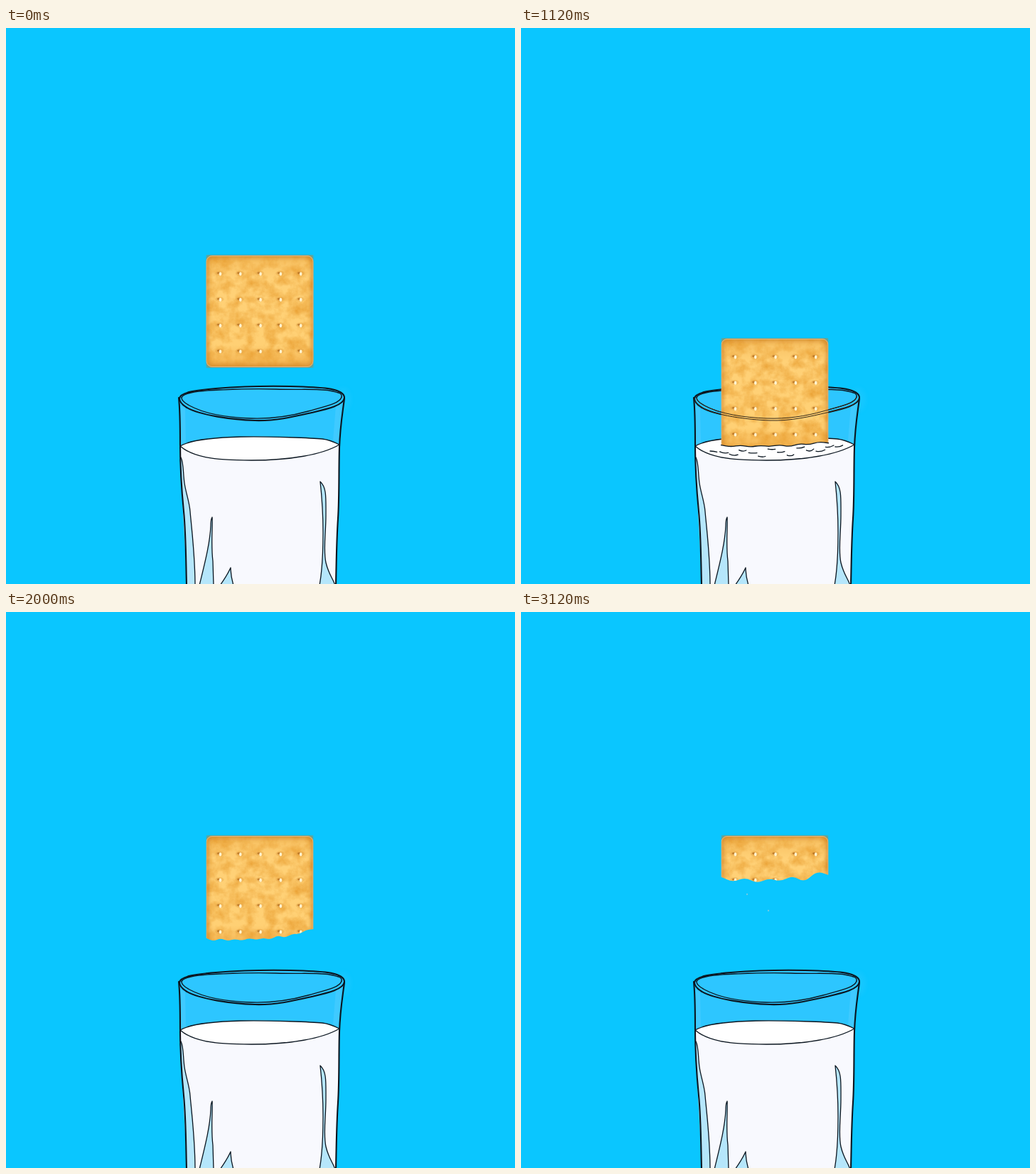
An HTML page for the animation above (3.2 s loop, 716 by 782 pixels).

```html
<!DOCTYPE html>
<html lang="en">
<head>
<meta charset="utf-8">
<title>Biscuit and milk</title>
<style>
html, body { margin: 0; width: 100%; height: 100%; overflow: hidden; background: #0ac6ff; }
svg { display: block; }
.line { fill: none; stroke: #0b1620; stroke-linecap: round; stroke-linejoin: round; stroke-width: 1.3; }
.bold { stroke-width: 2.1; }
.thin { stroke-width: 1; stroke: #33291a; }
.tint { fill: #b5e6fb; }
.milk { fill: #fff; }
</style>
</head>
<body>
<svg width="716" height="782" viewBox="0 0 716 782">
  <defs>
    <path id="front" d="M476 520C475 531 452 536 430 541S380 553 350 552S272 545 253 533Q244 527 244 521"/>
    <path id="innerFront" d="M472 519C470 528 450 532 425 539S375 550 345 549S280 543 258 531Q247 525 247 520"/>
    <linearGradient id="bake" x2="0" y2="1">
      <stop offset="0" stop-color="#f6bd5d"/>
      <stop offset=".2" stop-color="#ffd177"/>
      <stop offset=".8" stop-color="#ffd074"/>
      <stop offset="1" stop-color="#f2b04d"/>
    </linearGradient>
    <filter id="grain" x="0" y="0" width="1" height="1" color-interpolation-filters="sRGB">
      <feTurbulence type="fractalNoise" baseFrequency=".06" numOctaves="4" seed="8"/>
      <feColorMatrix values="0 0 0 0 .92  0 0 0 0 .64  0 0 0 0 .22  1.8 0 0 0 -.62"/>
      <feComposite in2="SourceGraphic" operator="in"/>
    </filter>
    <filter id="soft" x="-.5" y="-.5" width="2" height="2"><feGaussianBlur stdDeviation="3"/></filter>
    <clipPath id="cut"><path id="outline"/></clipPath>
  </defs>

  <rect width="716" height="782" fill="#0ac6ff"/>
  <ellipse cx="474" cy="523" rx="10" ry="16" fill="#2ccaff" opacity=".4" filter="url(#soft)"/>

  <!-- glass and milk -->
  <path fill="#2dc6ff" d="M244 521C245 512 270 509 295 507S360 503 400 504S476 506 476 520C473 540 469 560 469 590L245 590Z"/>
  <path fill="#52d0ff" opacity=".5" d="M246 531L252 535L253 585L246 587ZM464 531L472 527L468 584L460 580Z"/>
  <path fill="#f8f9fe" d="M245 589C244 620 252 690 254 782L464 782C465 710 469 690 469 586Z"/>
  <path class="line milk" d="M245 588C258 580 290 576 330 575S435 577 445 578S465 584 469 586C445 600 400 608 345 608S262 603 245 588Z"/>
  <path class="tint" d="M246 604C250 611 249 626 251 640S258 666 259 680S266 740 266 784L254 784C253 730 247 670 246 604Z"/>
  <path class="line" d="M246 604C250 611 249 626 251 640S258 666 259 680S266 740 266 784"/>
  <path class="line tint" d="M272 784C279 755 287 725 288 700Q288 691 290 688C291 700 288 725 291 750L292 784"/>
  <path class="line tint" d="M301 784Q311 770 316 759Q316 770 320 784"/>
  <path class="line tint" d="M441 784C445 762 446 735 446 710S445 665 442 638C451 646 450 660 450 685S446 735 450 752S460 774 463 784"/>
  <path class="line bold" d="M243 520C245 540 245 560 245 585S247 650 250 680S253 745 254 784M476 521C473 545 470 560 469 590S469 660 467 690S465 740 464 784"/>
  <path class="line bold" d="M244 521C245 512 270 509 295 507S360 503 400 504S476 506 476 520"/>
  <path class="line" d="M247 520C249 512 275 510 300 509S345 507 380 508S440 507 455 510S473 514 472 519"/>
  <use href="#front" class="line bold"/>
  <use href="#innerFront" class="line"/>

  <g id="biscuit">
    <g clip-path="url(#cut)">
      <rect width="151" height="157" rx="9" fill="url(#bake)"/>
      <rect width="151" height="157" rx="9" filter="url(#grain)"/>
      <rect width="151" height="157" rx="9" fill="none" stroke="#c97b20" stroke-width="6" opacity=".8" filter="url(#soft)"/>
      <g id="holes"></g>
      <rect x=".5" y=".5" width="150" height="156" rx="8" fill="none" stroke="#dcb886"/>
    </g>
    <path id="coat" fill="#fff"/>
  </g>

  <g id="ripples">
    <path id="dip" class="line"/>
    <path id="waves" class="line"/>
    <use href="#front" class="line thin"/>
    <use href="#innerFront" class="line thin"/>
  </g>
  <g id="crumbs" fill="#6fcbe6"></g>
</svg>

<script>
const byId = id => document.getElementById(id);
const setPath = (id, d) => byId(id).setAttribute('d', d);
const move = (id, x, y) => byId(id).setAttribute('transform', `translate(${x} ${y})`);
const show = (id, on) => byId(id).style.display = on ? '' : 'none';

const LEFT = 281.5, WIDTH = 151, HEIGHT = 157, HOLD = 320;

function random(seed) {
  return () => {
    const v = Math.sin(seed++ * 12.9898) * 43758.5453;
    return v - Math.floor(v);
  };
}

// ragged edge from left to right that climbs towards the right end
function ragged({ y, rise, rough, teeth, seed }) {
  const rand = random(seed);
  const at = i => {
    const u = i / teeth;
    const wobble = (i % 2 ? 1 : -1) * rough * (.3 + .7 * rand());
    return [u * WIDTH, y - rise * u ** 4 + wobble];
  };
  let [px, py] = at(0), d = `L${px} ${py}`;
  for (let i = 1; i <= teeth; i++) {
    const [x, h] = at(i);
    d += `Q${px} ${py} ${(px + x) / 2} ${(py + h) / 2}`;
    [px, py] = [x, h];
  }
  return d + `L${px} ${py}`;
}

const whole = `L0 ${HEIGHT + 1}L${WIDTH} ${HEIGHT + 1}`;
const dipped = ragged({ y: 151, rise: 6, rough: 2, teeth: 11, seed: 3 });
const bite = (n, y) => ragged({ y, rise: 17 - 2 * n, rough: 3 + 1.5 * n, teeth: 15 - 2 * n, seed: 20 + n });

// one entry per held pose
const poses = [
  { top: 320 },
  { top: 378 },
  { top: 437, edge: dipped, wet: true },
  { top: 437, edge: dipped, wet: true, drift: 4 },
  { top: 377, coat: true },
  { top: 315, coat: true },
  { top: 315, edge: bite(0, 146) },
  { top: 315, edge: bite(1, 123), crumbs: [[410, 452]] },
  { top: 315, edge: bite(2, 101), crumbs: [[410, 452]] },
  { top: 315, edge: bite(3, 62), crumbs: [[318, 397], [348, 420]] }
];

let holes = '';
for (let row = 0; row < 4; row++) {
  for (let col = 0; col < 5; col++) {
    holes += `<g transform="translate(${19 + 28.3 * col} ${25 + 36.4 * row})">
      <ellipse rx="6" ry="3.5" fill="#e09a3c" opacity=".35"/>
      <ellipse cx="-1.5" cy="-.5" rx="2.2" ry="1.5" fill="#a9651c" opacity=".65"/>
      <ellipse cx="1" cy=".8" rx="1.8" ry="2.6" fill="#fff3cf"/></g>`;
  }
}
byId('holes').innerHTML = holes;

// short dashes scattered over the milk in front of the biscuit
const rand = random(7);
let waves = '';
for (let i = 0; i < 14; i++) {
  const u = i / 13 * 2 - 1;
  const y = 592 - 3 * u + (i % 3) * 5 * (1 - u * u);
  waves += `M${350 + 88 * u} ${y}q6 ${rand() * 3} ${8 + 5 * rand()} ${-2 * u - rand()}`;
}
setPath('waves', waves);
setPath('dip', dipped.replace('L', 'M'));
move('dip', LEFT, 437);
setPath('coat', `M0 155${ragged({ y: 148, rise: 8, rough: 2.5, teeth: 11, seed: 40 })}V157Q75 166 0 155Z`);

let current;
function draw(now) {
  const index = Math.floor(now / HOLD) % poses.length;
  if (index !== current) {
    current = index;
    const { top, edge = whole, wet, coat, drift = 0, crumbs = [] } = poses[index];
    move('biscuit', LEFT, top);
    setPath('outline', `M${WIDTH} -1L0 -1${edge}Z`);
    move('waves', drift, 0);
    byId('crumbs').innerHTML = crumbs.map(([x, y]) => `<circle cx="${x}" cy="${y}" r="1.2"/>`).join('');
    show('coat', coat);
    show('ripples', wet);
  }
}

const start = performance.now();
function tick() {
  draw(performance.now() - start);
  requestAnimationFrame(tick);
}
tick();
</script>
</body>
</html>
```
